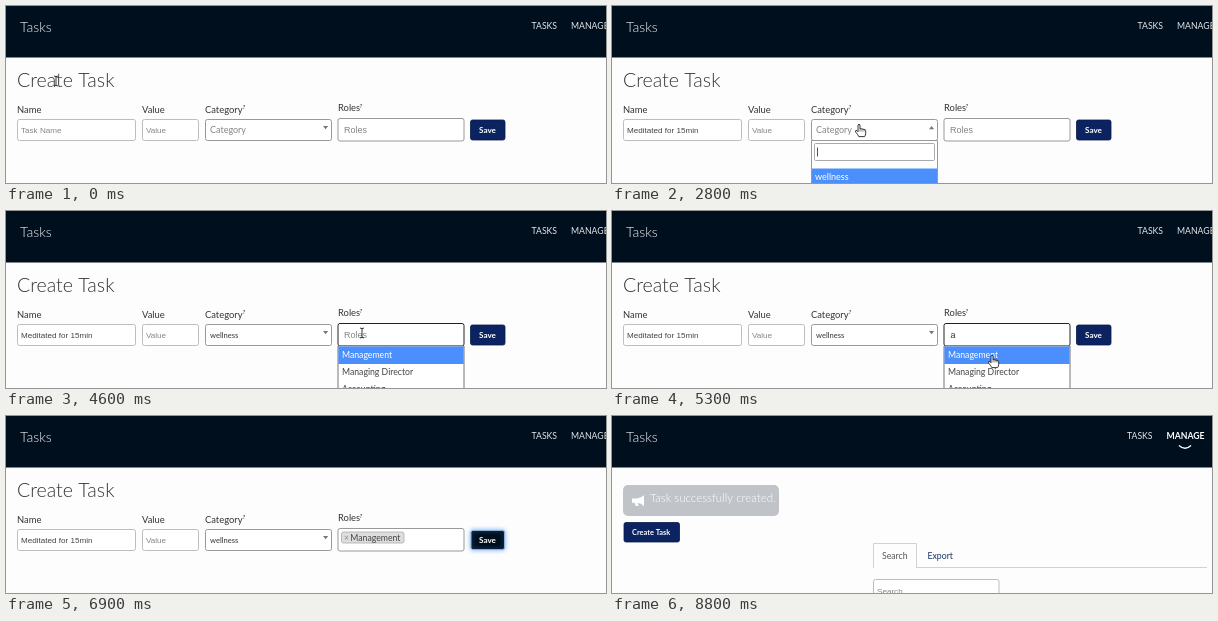
These frames come from a looping animation (600 by 177 pixels, 8.9 s). An HTML page with a canvas:

```html
<!DOCTYPE html>
<html lang="en">
<head>
<meta charset="utf-8">
<title>Create Task</title>
<style>
html, body { margin: 0; width: 100%; height: 100%; overflow: hidden; background: #fdfdfd; }
canvas { display: block; width: 600px; height: 177px; }
</style>
</head>
<body>
<canvas id="stage"></canvas>
<script>
const W = 600, H = 177, LOOP = 8900, STEP = 100;
const canvas = document.getElementById('stage');
const ctx = canvas.getContext('2d');
const scale = window.devicePixelRatio || 1;
canvas.width = W * scale;
canvas.height = H * scale;

const LATO = 'Lato, sans-serif';
const ARIAL = '"Liberation Sans", Arial, sans-serif';
const DARK = '#000f1e', NAVY = '#0b2361', INK = '#333', GREY = '#858585', BLUE = '#4a8ffb';

// Moments at which the page changes state
const AT = {
  focusName: 1000, typed: 1400, openCat: 2600, pickCat: 3300,
  openRoles: 4100, typeRole: 4900, pickRole: 5600, save: 6700, done: 7100
};
const TASK = 'Meditated for 15min';

// Pointer stops: time, x, y, shape until the next stop
const STOPS = [
  [0, 50, 75, 'beam'], [200, 50, 75, 'beam'], [800, 58, 118, 'beam'],
  [1900, 58, 118, 'beam'], [2500, 247, 118, 'hand'], [2800, 247, 118, 'hand'],
  [3200, 222, 168, 'hand'], [3300, 222, 168, 'arrow'], [3700, 359, 132, 'arrow'],
  [4000, 356, 122, 'beam'], [4700, 356, 122, 'arrow'], [5200, 380, 144, 'hand'],
  [5500, 380, 144, 'arrow'], [6200, 480, 124, 'hand'], [AT.save, 480, 124, 'hand']
];

const ARROW = new Path2D('M0 0V10L2.3 7.9L4 11.6L5.7 10.9L4.1 7.3H7.2Z');
const HAND = new Path2D('M-1 1Q0-.8 1 1V5Q2.2 3.9 3 5.2Q4.2 4.4 5 5.7Q6.5 5 6.7 6.7V9.4' +
  'Q6.7 11 5.6 12.6H-.2Q-1.2 10.5-3.2 8.2Q-4.2 6.6-3 6.3Q-2 6.2-1 7.8Z');
const HORN = new Path2D('M20 82.5H25Q29 82 32 79.2V90Q29 87.4 25.4 86.8L26.6 90H23.8L22.6 86.8H20Z');

const between = (t, a, b) => t >= a && t < b;

function text(str, x, y, size, color, weight = 400, family = LATO) {
  ctx.font = `${weight} ${size}px ${family}`;
  ctx.fillStyle = color;
  ctx.fillText(str, x, y);
}

function rect(x, y, w, h, color) {
  ctx.fillStyle = color;
  ctx.fillRect(x, y, w, h);
}

function box(x, y, w, h, r, fill, stroke, width = 1) {
  ctx.beginPath();
  ctx.roundRect(x, y, w, h, r);
  if (fill) {
    ctx.fillStyle = fill;
    ctx.fill();
  }
  if (stroke) {
    ctx.strokeStyle = stroke;
    ctx.lineWidth = width;
    ctx.stroke();
  }
}

function line(color, width, ...points) {
  ctx.beginPath();
  points.forEach(([x, y]) => ctx.lineTo(x, y));
  ctx.strokeStyle = color;
  ctx.lineWidth = width;
  ctx.stroke();
}

function glowBox(x, y, w, h, r, fill, stroke) {
  ctx.save();
  ctx.shadowColor = 'rgba(80,150,245,.75)';
  ctx.shadowBlur = 4 * scale;
  box(x, y, w, h, r, fill, stroke);
  ctx.restore();
}

function field(x, y, w, h, focused, stroke = '#bdbdbd') {
  if (focused) glowBox(x, y, w, h, 2, '#fff', '#68a3e8');
  else box(x, y, w, h, 2, '#fff', stroke);
}

function caret(x, y, h, age) {
  if (age % 1000 < 500) rect(x, y, .8, h, '#222');
}

function label(str, x, y, markX) {
  text(str, x, y, 9.4, INK);
  if (markX) text('?', markX, y - 3.5, 6.5, INK);
}

function header(managing) {
  rect(0, 0, W, 51.5, DARK);
  text('Tasks', 14, 25.5, 14, '#f2f3f5', 300);
  text('TASKS', managing ? 515 : 525.5, 23, 8.7, '#e2e5e9');
  text('MANAGE', managing ? 554.5 : 565, 23, 8.7, managing ? '#fff' : '#e2e5e9', managing ? 700 : 400);
  if (managing) {
    ctx.beginPath();
    ctx.moveTo(567, 29.5);
    ctx.quadraticCurveTo(573, 35, 579, 29.5);
    ctx.strokeStyle = '#fff';
    ctx.lineWidth = 1.4;
    ctx.stroke();
  }
}

function nameField(t) {
  const focused = between(t, AT.focusName, AT.openCat);
  const part = (t - AT.focusName) / (AT.typed - AT.focusName);
  const typed = TASK.slice(0, Math.round(TASK.length * Math.min(1, Math.max(0, part))));
  label('Name', 11, 106.5);
  field(11.5, 113.5, 118, 21, focused);
  text(typed || 'Task Name', 15, 127, 8.1, typed ? '#444' : GREY, 400, ARIAL);
  if (focused) caret(15.3 + (typed ? ctx.measureText(typed).width : 0), 119.5, 9, t - AT.focusName);
}

function valueField() {
  label('Value', 136, 106.5);
  field(136.5, 113.5, 56, 21);
  text('Value', 140, 127, 8.1, GREY, 400, ARIAL);
}

function categoryField(t) {
  const open = between(t, AT.openCat, AT.pickCat);
  const picked = t >= AT.pickCat;
  label('Category', 199, 106.5, 236.5);
  if (between(t, AT.pickCat, AT.openRoles)) box(199.5, 113.5, 126, 21, 2, '#fff', '#5b8ee0', 1.2);
  else field(199.5, 113.5, 126, 21, false, '#999');
  if (picked) text('wellness', 204, 126.5, 7.6, '#333');
  else text('Category', 204, 127, 9, GREY);

  const tip = open ? 120 : 123.2, base = open ? 123.2 : 120;
  ctx.beginPath();
  ctx.moveTo(317, base);
  ctx.lineTo(322.2, base);
  ctx.lineTo(319.6, tip);
  ctx.fillStyle = '#777';
  ctx.fill();

  if (!open) return;
  box(199.5, 134.5, 126, 60, 0, '#fff', '#999');
  box(202.5, 137.5, 120, 17, 1, '#fff', '#aaa');
  caret(205, 141.5, 9, t - AT.openCat);
  rect(200, 162.5, 125, 20, BLUE);
  text('wellness', 203, 174, 9, '#fff');
}

function rolesField(t) {
  const open = between(t, AT.openRoles, AT.pickRole);
  label('Roles', 332, 105, 353.5);
  field(332, 112.5, 126, 22.5, false, open ? '#222' : '#999');
  if (t >= AT.pickRole) {
    box(335.5, 116, 62.5, 11, 2, '#dedede', '#aaa', .8);
    text('×', 338, 125, 8.5, '#888');
    text('Management', 344.3, 125, 8.7, '#444');
  } else if (t >= AT.typeRole) {
    text('a', 338.5, 127, 9, '#333', 400, ARIAL);
  } else {
    text('Roles', 338, 127, 9, GREY, 400, ARIAL);
  }
  if (!open) return;
  box(332, 135, 126, 60, 0, '#fff', '#777');
  rect(332.4, 135.5, 125.2, 17.5, BLUE);
  text('Management', 336, 147, 8.7, '#fff');
  text('Managing Director', 336, 164, 8.7, '#444');
  text('Accounting', 336, 181, 8.7, '#444');
}

function saveButton(t) {
  if (t >= AT.save) glowBox(465, 114.5, 33.5, 19, 2, DARK, '#8fb1d6');
  else box(464.5, 114, 34.5, 20, 2, NAVY, '#081a4a', .8);
  text('Save', 473, 127, 8.1, '#fff', 700);
}

function formPage(t) {
  header(false);
  text('Create Task', 11, 81, 19.6, '#333', 300);
  nameField(t);
  valueField();
  categoryField(t);
  rolesField(t);
  saveButton(t);
}

function listPage() {
  header(true);
  box(11, 69, 156, 31, 5, '#c0c4c8');
  ctx.fillStyle = '#fff';
  ctx.fill(HORN);
  text('Task successfully created.', 38, 86.3, 11.5, '#fff', 300);
  box(12, 106.5, 55.5, 19.5, 2, NAVY, '#081a4a', .8);
  text('Create Task', 20, 119, 7.4, '#fff', 700);

  line('#d2d2d2', 1, [305, 151.5], [595, 151.5]);
  line('#d2d2d2', 1, [261.5, 152], [261.5, 127.5], [304.5, 127.5], [304.5, 152]);
  text('Search', 270, 142.7, 8.7, '#555');
  text('Export', 315.5, 142.7, 8.7, '#183268');
  field(261.5, 163.5, 125.5, 22);
  text('Search', 265, 178, 8.1, GREY, 400, ARIAL);
}

function pointer(t) {
  if (t >= AT.save) return;
  const i = STOPS.findIndex((s, n) => n + 1 < STOPS.length && t < STOPS[n + 1][0]);
  const [t0, x0, y0, shape] = STOPS[i];
  const [t1, x1, y1] = STOPS[i + 1];
  const p = (t - t0) / (t1 - t0);
  const e = p * p * (3 - 2 * p);
  ctx.save();
  ctx.translate(x0 + (x1 - x0) * e, y0 + (y1 - y0) * e);
  if (shape === 'beam') {
    line('#222', .9, [0, -4.5], [0, 4.5]);
    line('#222', .9, [-2, -5], [0, -4.4], [2, -5]);
    line('#222', .9, [-2, 5], [0, 4.4], [2, 5]);
  } else {
    const path = shape === 'hand' ? HAND : ARROW;
    ctx.fillStyle = '#fff';
    ctx.fill(path);
    ctx.strokeStyle = '#222';
    ctx.lineWidth = .9;
    ctx.lineJoin = 'round';
    ctx.stroke(path);
    if (shape === 'hand') {
      for (const x of [1, 3, 5]) line('#222', .6, [x, 5.2], [x, 7.5]);
    }
  }
  ctx.restore();
}

function draw(now) {
  const t = Math.floor((now % LOOP) / STEP) * STEP;
  ctx.setTransform(scale, 0, 0, scale, 0, 0);
  rect(0, 0, W, H, '#fdfdfd');
  if (t < AT.done) formPage(t);
  else listPage();
  pointer(t);
}

let start;
function tick(now) {
  start ??= now;
  draw(Math.max(0, now - start));
  requestAnimationFrame(tick);
}
draw(0);
requestAnimationFrame(tick);
</script>
</body>
</html>
```
